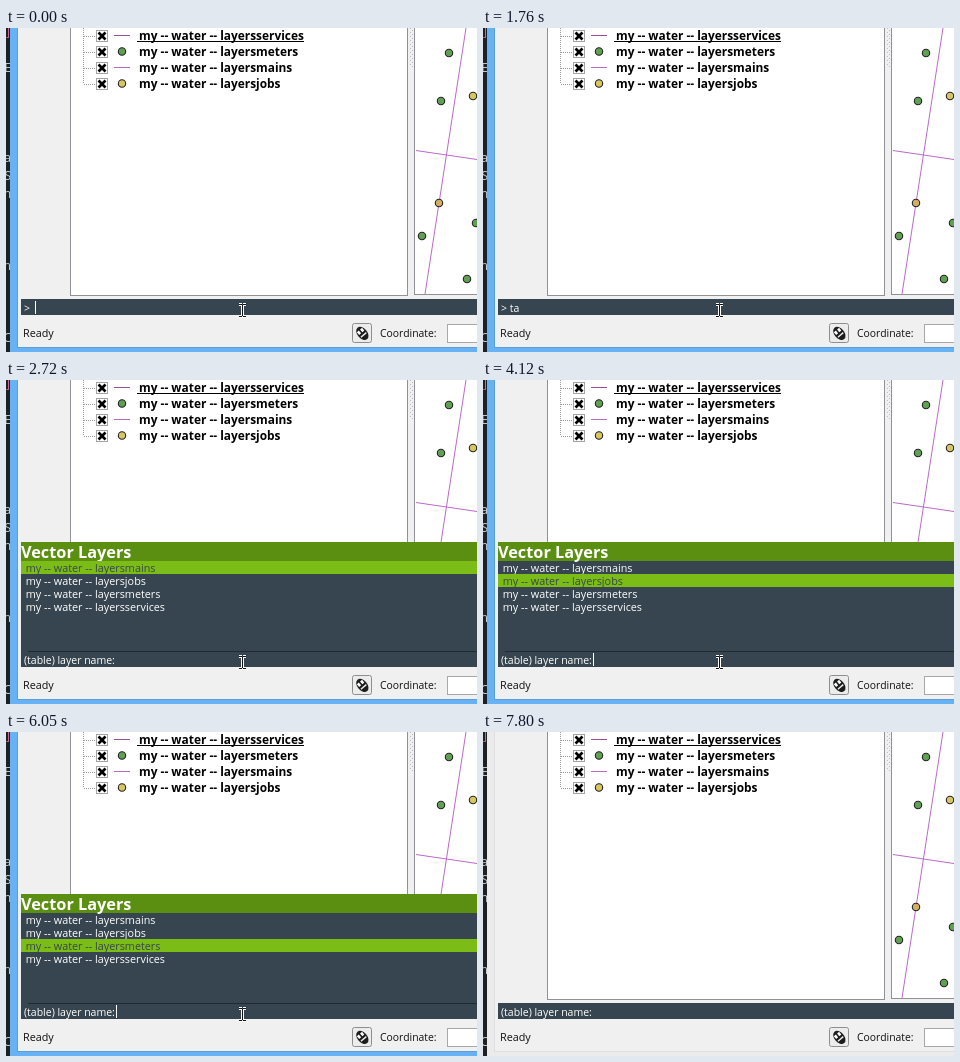
These frames come from a looping animation (471 by 324 pixels, 7.88 s). An HTML page with a canvas:

```html
<!DOCTYPE html>
<html lang="en">
<head>
<meta charset="utf-8">
<title>Command bar</title>
<style>
html, body { margin: 0; width: 100%; height: 100%; overflow: hidden; background: #f0f0f0; }
canvas { display: block; }
</style>
</head>
<body>
<canvas id="stage" width="471" height="324"></canvas>
<script>
const ctx = document.getElementById('stage').getContext('2d');
const LOOP = 7880;
const SLATE = '#36454f', TITLE = '#5b8f12', PICK = '#7cbc16', PURPLE = '#bb6ac9';
const GREEN = '#5fa052', YELLOW = '#d6c762', EDGE = '#8f9297';

const layer = name => ' my -- water -- layers' + name;
const commands = ['table', 'rename-layers', 'reload-packages', 'set-active-layer',
  'plugin-uninstall', 'help', 'load-from-file', 'table'];
const layers = ['mains', 'jobs', 'meters', 'services'].map(layer);

// Each track lists [start time, value]; a value holds until the next one.
const tracks = {
  caret: [[0, 1], [250, 0], [740, 1], [1300, 0], [2350, 1], [2720, 0], [3870, 1], [4360, 0],
    [5010, 1], [5540, 0], [6050, 1], [6450, 0], [7000, 1], [7520, 0]],
  prompt: [[0, '> '], [1610, '> t'], [1760, '> ta'], [1920, '> tab'], [2010, '> tabl'],
    [2350, '> table '], [2720, '(table) layer name:']],
  popup: [[0, ''], [1610, 'commands'], [1760, ''], [1920, 'commands'], [2010, ''],
    [2350, 'commands'], [2380, ''], [2720, 'layers'], [7800, '']],
  picked: [[0, 0], [4120, 1], [4270, 2], [4700, 3], [4920, 2], [5260, 1], [5440, 2],
    [5650, 3], [5930, 2], [6200, 1]],
  pointer: [[0, 1], [7120, 0]],
  active: [[0, 1], [7800, 0]]
};

function valueAt(track, t) {
  let value;
  for (const [start, v] of track) if (t >= start) value = v;
  return value;
}

function rect(x, y, w, h, color) {
  ctx.fillStyle = color;
  ctx.fillRect(x, y, w, h);
}

function frame(x, y, w, h, color) {
  ctx.strokeStyle = color;
  ctx.lineWidth = 1;
  ctx.strokeRect(x + 0.5, y + 0.5, w - 1, h - 1);
}

function line(x1, y1, x2, y2, color, width = 1, dash = []) {
  ctx.strokeStyle = color;
  ctx.lineWidth = width;
  ctx.setLineDash(dash);
  ctx.beginPath();
  ctx.moveTo(x1, y1);
  ctx.lineTo(x2, y2);
  ctx.stroke();
  ctx.setLineDash([]);
}

function dot(x, y, color, r = 3.7) {
  ctx.beginPath();
  ctx.arc(x, y, r, 0, Math.PI * 2);
  ctx.fillStyle = color;
  ctx.fill();
  ctx.strokeStyle = '#222';
  ctx.lineWidth = 1.1;
  ctx.stroke();
}

function text(str, x, y, color, size = 10.8, weight = 400) {
  ctx.font = `${weight} ${size}px "Open Sans", "Noto Sans", sans-serif`;
  ctx.fillStyle = color;
  ctx.fillText(str, x, y);
}

function drawWindow(active) {
  const border = active ? '#66b2f5' : '#ebebeb';
  const inner = active ? '#5a9fdc' : '#dedede';
  rect(4, 0, 467, 324, border);
  rect(11, 0, 460, 320, inner);
  rect(12, 0, 459, 319, '#f0f0f0');

  ctx.save();
  ctx.beginPath();
  ctx.rect(0, 0, 4, 324);
  ctx.clip();
  rect(0, 0, 4, 324, '#1e2024');
  ctx.textAlign = 'right';
  text(']', 4, 8, '#d06a8a', 12);
  for (const [ch, y] of [['E', 44], ['a', 134], ['S', 152], ['h', 170], ['m', 242], ['C', 314]])
    text(ch, 5, y, '#d0d0d0', 12);
  ctx.restore();
}

function drawTree() {
  rect(64, 0, 338, 268, EDGE);
  rect(65, 0, 336, 267, '#fff');
  line(77.5, 0, 77.5, 56, '#999', 1, [1, 1]);
  ['services', 'meters', 'mains', 'jobs'].forEach((name, i) => {
    const y = 8 + i * 16;
    line(78, y + 0.5, 89, y + 0.5, '#999', 1, [1, 1]);
    rect(90, y - 6, 12, 12, '#fff');
    frame(90, y - 6, 12, 12, '#a4a4a4');
    line(92.5, y - 3.5, 99.5, y + 3.5, '#000', 2.7);
    line(99.5, y - 3.5, 92.5, y + 3.5, '#000', 2.7);
    if (i % 2) dot(116, y - 0.5, i === 1 ? GREEN : YELLOW);
    else line(108, y - 0.5, 124, y - 0.5, i ? PURPLE : '#a04a98');
    text(layer(name), 130, y + 4, '#000', 11.9, 700);
  });
  rect(131, 13, 167, 1, '#000');
}

function drawMap() {
  for (let y = 0; y < 38; y += 4) {
    rect(404, y, 1, 1, '#bbb');
    rect(406, y + 2, 1, 1, '#bbb');
  }
  rect(408, 0, 63, 267, EDGE);
  rect(409, 0, 62, 266, '#fff');
  line(460, 0, 419, 266, PURPLE);
  line(410, 122.5, 471, 131.5, PURPLE);
  for (const [x, y] of [[443, 25], [435, 73], [416, 208], [470, 195], [461, 251]]) dot(x, y, GREEN);
  dot(467, 68, YELLOW);
  dot(433, 175, '#d3ad62');
}

function drawStatus() {
  text('Ready', 17, 309, '#111', 10.8);
  text('Coordinate:', 374, 309, '#111', 10.4);
  ctx.beginPath();
  ctx.roundRect(346.5, 295.5, 19, 19, 2);
  ctx.fillStyle = '#ececec';
  ctx.fill();
  ctx.strokeStyle = '#8e8e8e';
  ctx.lineWidth = 1;
  ctx.stroke();

  ctx.save();
  ctx.translate(356, 305);
  ctx.rotate(-0.7);
  ctx.beginPath();
  ctx.ellipse(0, 0.5, 5, 7.5, 0, 0, Math.PI * 2);
  ctx.fillStyle = '#1c1c1c';
  ctx.fill();
  rect(-3.4, -4, 2.6, 3.6, '#fff');
  rect(0.8, -4, 2.6, 3.6, '#fff');
  line(-3.5, 2.5, 3.5, 2.5, '#eee', 1.4);
  ctx.restore();

  rect(441, 296, 30, 19, '#fff');
  frame(441, 296, 31, 19, '#a8a8a8');
}

function drawPopup(title, items, top, picked, outlined) {
  rect(15, top, 456, 271 - top, SLATE);
  rect(15, top, 456, 19, TITLE);
  text(title, 15, top + 16, '#fff', 16.3, 700);
  ctx.save();
  ctx.beginPath();
  ctx.rect(15, top, 456, 271 - top);
  ctx.clip();
  items.forEach((item, i) => {
    const y = top + 19 + i * 13;
    if (i === picked) rect(15, y, 456, 13, PICK);
    if (i === picked && outlined) frame(15, y, 457, 13, '#8743bd');
    text(item, 17, y + 11, i === picked ? SLATE : '#fff');
  });
  ctx.restore();
}

function drawBar(prompt, caret, hasPopup) {
  rect(15, 271, 456, 16, SLATE);
  if (hasPopup) rect(22, 271, 449, 1, '#1f2b33');
  text(prompt, 18, 284, '#fff', 10.5);
  if (!caret) return;
  const x = prompt === '> ' ? 29 : prompt[0] === '(' ? 110 : 57;
  rect(x, 273, 1, 13, '#fff');
}

function drawPointer() {
  const strokes = (color, width) => {
    line(236.5, 277, 236.5, 288, color, width);
    for (const y of [276.5, 288.5]) {
      line(233, y, 236, y, color, width);
      line(237, y, 240, y, color, width);
    }
  };
  strokes('#fff', 3);
  strokes('#111', 1);
}

function draw(t) {
  const now = {};
  for (const key in tracks) now[key] = valueAt(tracks[key], t);
  drawWindow(now.active);
  drawTree();
  drawMap();
  drawStatus();
  if (now.popup === 'commands') drawPopup('Commands', commands, 151, 0, true);
  if (now.popup === 'layers') drawPopup('Vector Layers', layers, 162, now.picked, false);
  drawBar(now.prompt, now.caret, now.popup);
  if (now.pointer) drawPointer();
}

const begin = performance.now();
function tick() {
  draw((performance.now() - begin) % LOOP);
  requestAnimationFrame(tick);
}
tick();
</script>
</body>
</html>
```
